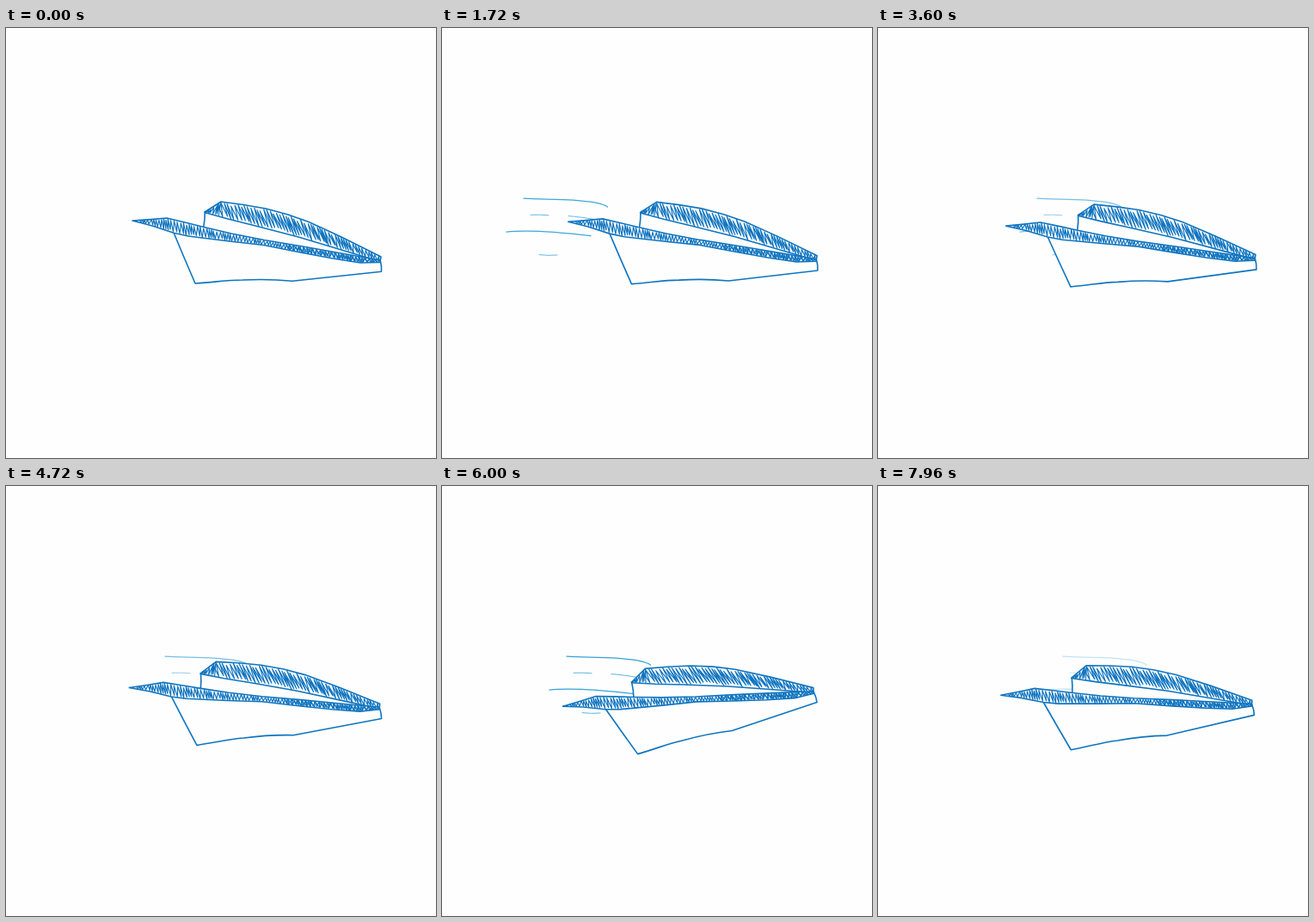
Write an HTML page that moves like this. It is 500 px wide and 500 px high and loops after 8000 ms.

```html
<!DOCTYPE html>
<html lang="en">
<head>
<meta charset="utf-8">
<title>Paper plane</title>
<style>
  html, body { margin: 0; width: 100%; height: 100%; overflow: hidden; background: #fefefe; }
  svg { display: block; width: 100vw; height: 100vh; }
  path { fill: none; stroke-linecap: round; stroke-linejoin: round; }
  #wind path { stroke: #2b9ed6; stroke-width: 1.3; }
  #wind .thin { stroke-width: 1; opacity: .8; }
  #plane path { stroke: #0f74bf; stroke-width: 1.6; }
  #plane .paper { fill: #fefefe; }
  #plane .hatch { stroke-width: 1.15; }
</style>
</head>
<body>
<svg viewBox="0 0 500 500">
  <g id="wind">
    <path d="M185 198.2C204 199.5 225 198.6 243 200.2C260 201.8 275 202.6 282.5 208"/>
    <path class="thin" d="M193 217.3Q204 216.8 214 217.8"/>
    <path class="thin" d="M237 218.6Q250 219.6 268 222.6"/>
    <path d="M165 237.2C187 234.6 225 237.2 263 241.6"/>
    <path class="thin" d="M203 263.6Q214 265 224 264"/>
  </g>
  <g id="plane">
    <path class="paper" d="M195 238L220 297C245 295 256 293 275 293Q305 291.5 333 294.3L436.5 283L435.5 271L250 202L231 214L230 232Z" stroke="none" style="stroke:none"/>
    <path d="M195 238Q207 267 220 297C245 295.4 256 293 275 293Q305 291.4 333 294.3L436.5 283.3Q437 277 435.4 271"/>
    <path id="upper" class="paper"/>
    <path id="upperHatch" class="hatch"/>
    <path d="M231.3 214Q231.3 223 229.8 231"/>
    <path id="lower" class="paper"/>
    <path id="lowerHatch" class="hatch"/>
    <path id="noseHatch" class="hatch"/>
    <path id="tailHatch" class="hatch"/>
  </g>
</svg>
<script>
const LOOP = 8000, FLIGHT = 3360, GUST = 1120;
const $ = id => document.getElementById(id);

const wings = {
  upper: {
    top: [[231, 214], [250, 202], [276, 205.5], [302, 210], [328, 217], [352, 225.5], [390, 243], [436, 266]],
    bottom: [[231, 214.5], [258, 222], [290, 230], [340, 243], [400, 261], [435, 271.5]]
  },
  lower: {
    top: [[147, 224], [168, 222.6], [187, 221], [208, 226], [230, 231.5], [262, 239], [300, 246.5], [345, 254], [390, 262], [435, 270]],
    bottom: [[147, 224], [170, 230], [195, 238.3], [212, 242], [260, 248], [300, 252.5], [340, 260.5], [380, 268], [412, 273], [435, 272.5]]
  }
};

// Value of column c at position x; monotone cubic between points.
function sample(points, x, c = 1) {
  const last = points.length - 1;
  let i = 0;
  while (i < last - 1 && x > points[i + 1][0]) i++;
  const slope = k => k < 0 || k >= last ? 0 :
    (points[k + 1][c] - points[k][c]) / (points[k + 1][0] - points[k][0]);
  const tangent = k => {
    const a = slope(k - 1), b = slope(k);
    return a * b > 0 ? 2 * a * b / (a + b) : 0;
  };
  const [p, q] = [points[i], points[i + 1]];
  const w = q[0] - p[0], u = Math.min(1, Math.max(0, (x - p[0]) / w)), v = 1 - u;
  return p[c] * v * v * (1 + 2 * u) + q[c] * u * u * (3 - 2 * u)
    + w * u * v * (v * tangent(i) - u * tangent(i + 1));
}

function linear(points, x) {
  const i = Math.max(1, points.findIndex(p => p[0] >= x));
  const [[x0, y0], [x1, y1]] = [points[i - 1], points[i]];
  return y0 + (y1 - y0) * (x - x0) / (x1 - x0);
}

function random(seed) {
  return () => (seed = seed * 16807 % 2147483647) / 2147483647;
}

const toPath = points => 'M' + points.map(p => p.map(n => n.toFixed(1)).join(' ')).join('L');

function outline(id) {
  const { top, bottom } = wings[id];
  $(id).setAttribute('d', toPath([...top, ...[...bottom].reverse()]) + 'Z');
}

// Pen zigzag between the two edges of a wing.
function hatch(id, wing, from, to, step, lean, seed) {
  const { top, bottom } = wings[wing], rnd = random(seed), points = [];
  for (let x = from; x < to; x += step * (.65 + .7 * rnd())) {
    const height = linear(bottom, x) - linear(top, x);
    const foot = Math.min(to, x + lean * height);
    points.push([x, linear(top, x) + rnd() * height * .18]);
    points.push([foot, linear(bottom, foot) - rnd() * height * .2]);
  }
  $(id).setAttribute('d', toPath(points));
}

outline('upper');
outline('lower');
hatch('upperHatch', 'upper', 246, 434, 3.7, .42, 71);
hatch('lowerHatch', 'lower', 156, 434, 3.3, .2, 23);
hatch('noseHatch', 'lower', 325, 432, 5, .7, 47);
hatch('tailHatch', 'upper', 233, 250, 3, -.15, 19);

// time, climb angle, drift x, drift y
const flight = [
  [0, 0, 0, 0], [240, 1.7, 2.7, 1.9], [560, 7, 1, 1], [840, 12, -1.5, .5],
  [1000, 8.5, -1, 0], [1240, 7.1, -1.5, 1.4], [1360, 4.6, -1.8, -1],
  [1720, .5, 0, 0], [2100, 3.5, 0, .5], [2480, 8, -1.3, .5],
  [2640, 12.5, -3.4, .5], [2720, 13, -3, .8], [3000, 6.5, 1.5, 1], [FLIGHT, 0, 0, 0]
];
const gustOpacity = [[0, 0], [40, 0], [160, .28], [280, .65], [440, .95], [660, .9], [1000, 0], [GUST, 0]];

function draw(t) {
  const [angle, x, y] = [1, 2, 3].map(c => sample(flight, t % FLIGHT, c));
  $('plane').setAttribute('transform', `translate(${x} ${y}) rotate(${-angle} 290 254)`);

  const gust = (t + 1160) % GUST;
  const age = (gust + 0) % GUST;
  $('wind').setAttribute('transform', `translate(${(280 - age) / 4} 0)`);
  $('wind').setAttribute('opacity', linear(gustOpacity, age));
}

let start;
function tick(now) {
  start ??= now;
  draw((now - start) % LOOP);
  requestAnimationFrame(tick);
}
draw(0);
requestAnimationFrame(tick);
</script>
</body>
</html>
```
